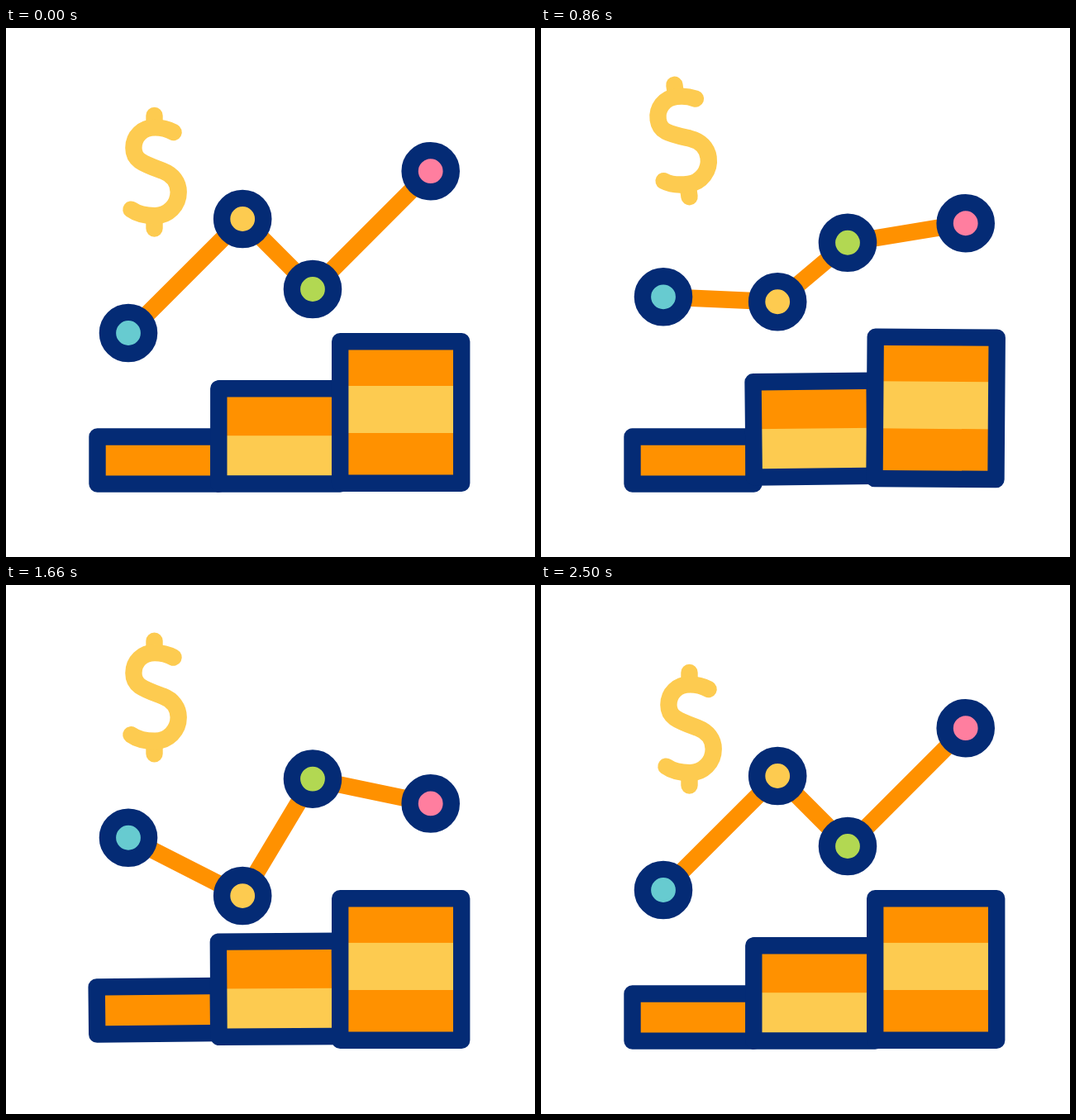
Write an HTML page that moves like this. It is 640x640 px and loops after 3020 ms.

```html
<!DOCTYPE html>
<html lang="en">
<head>
<meta charset="utf-8">
<title>Growth chart</title>
<style>
  html, body { margin: 0; width: 100%; height: 100%; overflow: hidden; background: #fff; }
  svg { display: block; width: 100%; height: 100%; }
  .trend { fill: none; stroke: #ff9100; stroke-width: 20.4; }
  .node { stroke: #042b75; stroke-width: 20.4; }
  .frame { fill: none; stroke: #042b75; stroke-width: 20.4; stroke-linejoin: round; }
  .coin { fill: none; stroke: #fdcb50; stroke-width: 20.4; stroke-linecap: round; stroke-linejoin: round; }
</style>
</head>
<body>
<svg viewBox="0 0 640 640">
  <g id="dollar" class="coin">
    <path d="M179.5 106V120M179.5 229V242.6"/>
    <path d="M202.6 126C195.5 122.3 188 120.4 180 120.4C165 120.4 154.4 131 154.4 145
      C154.4 151.5 157 157 162 160.6C169.5 165.8 181 169.6 190 173
      C201.5 177.4 208.7 187 208.7 198.5C208.7 214.5 196 227 180.5 227.2C166 227.3 157.5 224 151.4 219.6"/>
  </g>
  <polyline id="trend" class="trend"/>
  <g id="nodes"></g>
  <g id="boxes"></g>
</svg>
<script>
const LOOP = 3020, SWING = 600, STAGGER = 800;
const ORANGE = '#ff9100', YELLOW = '#fdcb50';
const $ = id => document.getElementById(id);

function add(parent, tag, attrs) {
  const el = document.createElementNS('http://www.w3.org/2000/svg', tag);
  for (const k in attrs) el.setAttribute(k, attrs[k]);
  return parent.appendChild(el);
}

// Progress 0..1 from t0 to t1 along cubic-bezier(a, 0, b, 1)
function ease(t, t0, t1, a = 1 / 3, b = 2 / 3) {
  const x = Math.min(1, Math.max(0, (t - t0) / (t1 - t0)));
  let lo = 0, hi = 1;
  for (let i = 0; i < 24; i++) {
    const s = (lo + hi) / 2, r = 1 - s;
    if (3 * r * r * s * a + 3 * r * s * s * b + s * s * s < x) lo = s; else hi = s;
  }
  const s = (lo + hi) / 2;
  return x === 0 || x === 1 ? x : s * s * (3 - 2 * s);
}

// x, resting y, vertical travel, colour
const nodes = [
  [148, 369, -73.2, '#67cbd0'],
  [286.2, 231, 167.9, YELLOW],
  [371, 316, -94.2, '#b2d852'],
  [513.7, 173.2, 105.6, '#ff7e9f']
].map(([x, y, dy, fill]) => ({
  x, y, dy, el: add($('nodes'), 'circle', { class: 'node', cx: x, r: 25.1, fill })
}));

// Outline, colour bands as [top, colour], lift offset and tilt; painted left to right
const boxes = [
  { l: 110.5, r: 257.5, t: 494.5, b: 551.6, bands: [[494, ORANGE]], dx: -7, tilt: -7.7, start: 2 * STAGGER },
  { l: 257.3, r: 404.3, t: 436.3, b: 551.5, bands: [[436, ORANGE], [493.2, YELLOW]], dx: -2, tilt: -7.6, start: STAGGER },
  { l: 404.2, r: 551.2, t: 379.3, b: 550.7, bands: [[379, ORANGE], [432.9, YELLOW], [490, ORANGE]], dx: -2.2, tilt: 9, start: 0 }
];
for (const k of boxes) {
  k.el = add($('boxes'), 'g', {});
  for (const [y, fill] of k.bands)
    add(k.el, 'rect', { x: k.l, y, width: k.r - k.l, height: k.b - y, fill });
  add(k.el, 'rect', { class: 'frame', x: k.l, y: k.t, width: k.r - k.l, height: k.b - k.t });
}

function draw(t) {
  const c = Math.min(t, 4 * SWING) % (2 * SWING);
  const p = ease(c, 0, SWING) - ease(c, SWING, 2 * SWING);
  $('trend').setAttribute('points', nodes.map(n => {
    const y = n.y + n.dy * p;
    n.el.setAttribute('cy', y);
    return n.x + ',' + y;
  }).join(' '));

  for (const k of boxes) {
    const s = t - k.start;
    const u = ease(s, 0, 400, .33, .4) - ease(s, 600, 890, .66, .72);
    k.el.setAttribute('transform',
      `translate(${k.dx * u} ${-110 * u}) rotate(${k.tilt * u} ${(k.l + k.r) / 2} ${(k.t + k.b) / 2})`);
  }

  const rise = ease(t, 200, 560) - ease(t, 2060, 2420);
  const lean = ease(t, 560, 900) - ease(t, 900, 1260);
  $('dollar').setAttribute('transform', `translate(0 ${-38.4 * rise}) rotate(${-7.9 * lean} 179.5 242.6)`);
}

const began = performance.now();
function tick() {
  draw((performance.now() - began) % LOOP);
  requestAnimationFrame(tick);
}
tick();
</script>
</body>
</html>
```
